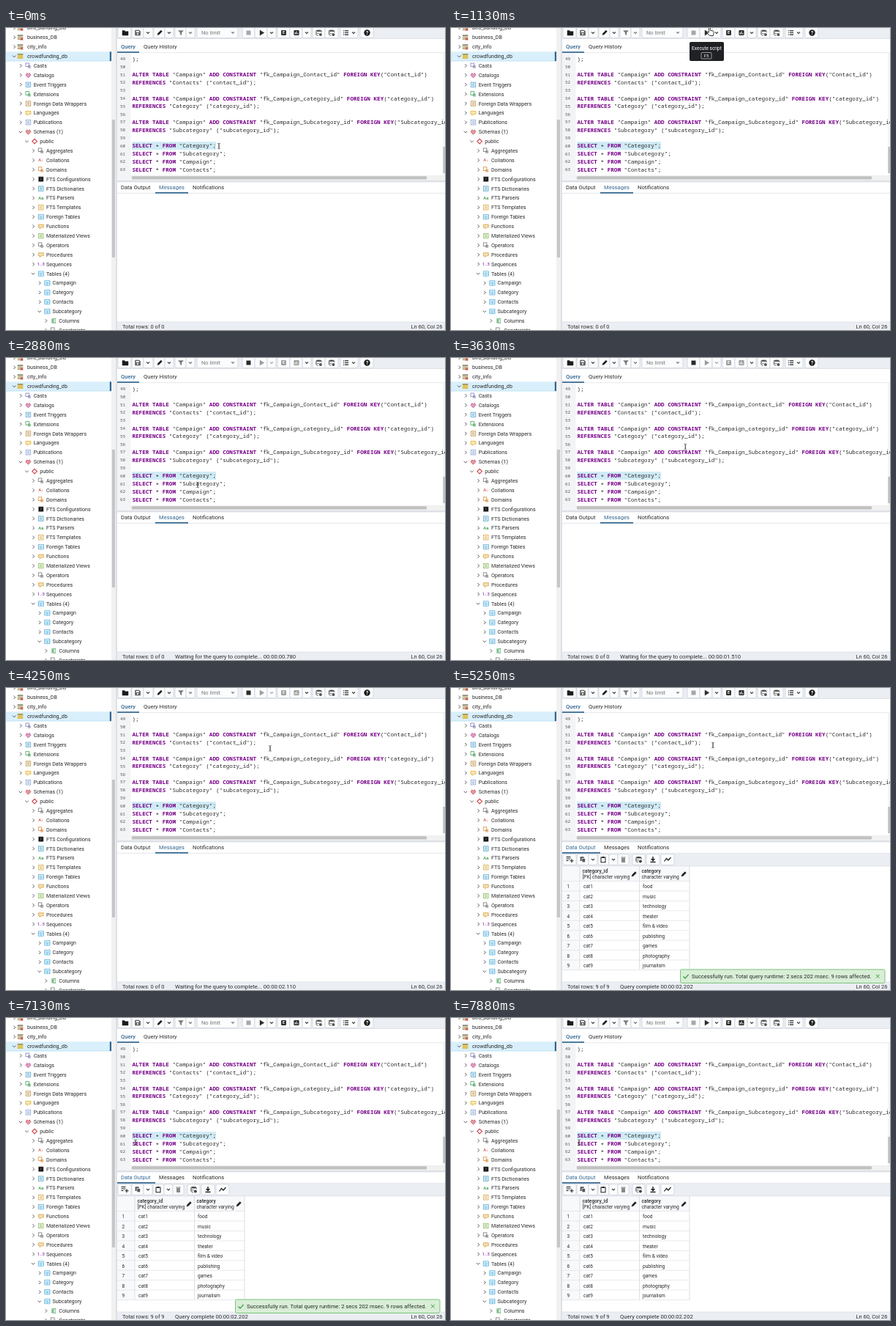
Write an HTML page that moves like this. It is 600x412 px and loops after 8 s.

```html
<!DOCTYPE html>
<html lang="en">
<head>
<meta charset="utf-8">
<title>Query tool</title>
<style>
  html, body { margin: 0; width: 100%; height: 100%; overflow: hidden; background: #fff; }
  svg { display: block; width: 600px; height: 412px; }
  text { font-family: Roboto, sans-serif; white-space: pre; }
  .code { font-family: "Noto Sans Mono", monospace; }
  .kw { font-weight: 700; fill: #708; }
  .stop { opacity: .4; }
  .running .stop { opacity: 1; }
  .running .exec { opacity: .45; }
</style>
</head>
<body>
<svg id="stage" viewBox="0 0 600 412"></svg>
<script>
const INK = '#2a2a2a', BLUE = '#326690', BAR = '#ebeef3', LINE = '#dde0e6';

const rect = (x, y, w, h, fill, more = '') =>
  `<rect x="${x}" y="${y}" width="${w}" height="${h}" fill="${fill}" ${more}/>`;
const path = (d, stroke = INK, width = 1, fill = 'none') =>
  `<path d="${d}" stroke="${stroke}" stroke-width="${width}" fill="${fill}"/>`;
// y is the vertical middle of the text
const text = (x, y, s, size = 7.6, fill = INK, more = '') =>
  `<text x="${x}" y="${y + size * .35}" font-size="${size}" fill="${fill}" ${more}>${s}</text>`;
const group = (body, attrs = '') => `<g ${attrs}>${body}</g>`;
const at = (x, y, body) => group(body, `transform="translate(${x} ${y})"`);
const caret = (x, y, color = '#444') => path(`M${x - 2} ${y - 1}l2 2l2-2`, color, 1.1);
const button = (x, y, w, h) => rect(x, y, w, h, '#fbfcfd', 'stroke="#c9cfd8" stroke-width=".7" rx="2"');

// ---- object tree -------------------------------------------------
const TREE = `0 > off bird_banding_DB
0 > off business_DB
0 > off city_info
0 v db crowdfunding_db
1 > boxes#7d7fb5 Casts
1 > heart#c14f8e Catalogs
1 > cells#4a9cd0 Event Triggers
1 > boxes#45a05a Extensions
1 > cells#b98b3c Foreign Data Wrappers
1 > bubble#e5b52c Languages
1 > cells#7f9fd0 Publications
1 v heart#c44a54 Schemas (1)
2 v diamond#d0474e public
3 > boxes#777 Aggregates
3 > glyph#d0605c:A↓ Collations
3 > boxes#d98a35 Domains
3 > cells#888 FTS Configurations
3 > cells#3c9cc4 FTS Dictionaries
3 > glyph#46a04c:Aa FTS Parsers
3 > cells#d9a33a FTS Templates
3 > table#3f9ac9 Foreign Tables
3 > bubble#d9a33a Functions
3 > cells#7fb84c Materialized Views
3 > boxes#777 Operators
3 > bubble#d9a33a Procedures
3 > glyph#9a4fb5:1..3 Sequences
3 v table#2f9fd8 Tables (4)
4 > table#2f9fd8 Campaign
4 > table#2f9fd8 Category
4 > table#2f9fd8 Contacts
4 v table#2f9fd8 Subcategory
5 > cols#45a05a Columns
5 > boxes#777 Constraints`;

const disk = (...colors) => colors.map((c, i) =>
  rect(-4, -3.5 + i * 2.4, 8, 1.9, c, 'rx=".9"')).join('');
const ICONS = {
  off: () => disk('#8f8a72', '#b9ad80', '#b9ad80') + path('M.6 .8l3 3m0-3l-3 3', '#d23b3b', 1.1),
  db: () => disk('#a89a55', '#e3b52d', '#e3b52d'),
  boxes: c => rect(-3.5, -3.5, 4.6, 4.6, 'none', `stroke="${c}" stroke-width=".8"`)
    + rect(-.6, -.6, 4, 4, c, 'opacity=".6"'),
  heart: c => path('M0 3.5L-3.4 0L-1.8-2.8L0-1.4L1.8-2.8L3.4 0Z', c, .8, c + '88'),
  cells: c => rect(-3.3, -3.2, 6.6, 6.4, c + '22', `stroke="${c}" stroke-width=".7"`)
    + path('M-1.6-1h3.2M-1.6 1h3.2', c, .8),
  bubble: c => path('M-3.5-2.5h7v4h-3l-2 2v-2h-2z', c, .8, c + '55'),
  diamond: c => path('M0-3.3L3.3 0L0 3.3L-3.3 0Z', c, 1.2),
  table: c => rect(-3.6, -3.2, 7.2, 6.4, '#eef8fd', `stroke="${c}" stroke-width=".6"`)
    + path('M-3.6-1.1h7.2M-3.6 1h7.2M0-1.1v4.3', c, .5),
  cols: c => rect(-2.6, -3.2, 2.1, 6.4, c, 'opacity=".8"')
    + rect(.6, -3.2, 2.1, 6.4, 'none', `stroke="${c}" stroke-width=".6"`),
  glyph: (c, s) => text(0, 0, s, 5.8, c, 'text-anchor="middle" font-weight="700"'),
};

function tree() {
  let out = rect(0, 32.3, 144, 12.8, '#d9effb') + path('M0 45h144', '#a9d3ec', .6)
    + rect(141.8, 32.3, 2.2, 12.8, BLUE);
  TREE.split('\n').forEach((row, i) => {
    const [, level, state, icon, label] = row.match(/^(\d) (\S) (\S+) (.+)$/);
    const [, kind, color, glyph] = icon.match(/^(\w+?)(#\w+)?(?::(.*))?$/);
    const y = 38.6 + (i - 3) * 12.89, x = 29 + level * 8.65;
    out += state === 'v' ? path(`M${x - 20} ${y - 1}l2.2 2.2l2.2-2.2`, '#444', .9)
                         : path(`M${x - 18.5} ${y - 2.2}l2.2 2.2l-2.2 2.2`, '#444', .9);
    out += at(x - (level > 0 ? 7.2 : 9.5), y, ICONS[kind](color, glyph)) + text(x, y, label, 7.15);
  });
  return out + rect(144, 0, 6, 412, '#f1f1f1') + rect(144.8, 125, 4.2, 188, '#c4c6c9')
    + rect(150, 0, 2, 412, LINE);
}

// ---- toolbars ----------------------------------------------------
const SHAPES = {
  folder: c => path('M-4-3h3l1 1.2h4v5.3h-8z', c, .5, c),
  save: c => path('M-3.4-3.4h5.4l1.5 1.5v5.3h-6.9z', c, .8, c) + rect(-2.2, -2.5, 4, 1.8, '#fff') + '<circle cy="1.5" r="1.1" fill="#fff"/>',
  pencil: c => path('M-3 3L-2.4.8L1.8-3.4L3.4-1.8L-.8 2.4Z', c, .4, c),
  filter: c => path('M-3.4-3h6.8L.9 0v3.2l-1.8-1.2V0z', c, .4, c),
  stop: c => rect(-3, -3, 6, 6, c),
  play: c => path('M-2.5-3.6L3.3 0L-2.5 3.6z', c, .4, c),
  explain: c => rect(-3.4, -3.6, 6.8, 7.2, c, 'rx="1"') + text(0, 0, 'E', 5.4, '#fff', 'text-anchor="middle" font-weight="700"'),
  chart: c => rect(-3.6, -3.4, 7.2, 6.8, c, 'rx="1"') + path('M-1.8 2v-2.4M0 2v-4M1.8 2v-1.4', '#fff', 1),
  store: c => `<ellipse cy="-2.8" rx="3.6" ry="1.3" fill="${c}"/>`
    + path('M-3.6-2.8v5.4q1.2 1 3 1M3.6-2.8v2.4M-3.6 0q1.4 1.1 3.8.9', c, .9)
    + `<circle cx="2.4" cy="2.4" r="2" fill="${c}"/>`,
  list: c => path('M-1.6-2.6h5.2M-1.6 0h5.2M-1.6 2.6h5.2', c, 1.1) + path('M-3.6-2.6h1M-3.6 0h1M-3.6 2.6h1', c, 1.2),
  help: c => `<circle r="4.2" fill="${c}"/>` + text(0, 0, '?', 6.5, '#fff', 'text-anchor="middle" font-weight="700"'),
  addRow: c => path('M-4.5-2.5h6M-4.5 0h6M-4.5 2.5h3M3 .2v5M.5 2.7h5', c, 1.1),
  copy: c => rect(-3.4, -3.8, 5, 5.8, c) + rect(-1, -1.6, 4.6, 5.4, c, 'stroke="#fff" stroke-width=".7"'),
  paste: c => rect(-3, -3, 6, 6.8, 'none', `stroke="${c}"`) + rect(-1.5, -4, 3, 2, c),
  trash: c => rect(-2.5, -2, 5, 6, c) + path('M-3.3-3h6.6', c, 1.1),
  down: c => path('M0-4v5M-2.4-1L0 1.4L2.4-1', c, 1.4) + path('M-3.6 3.4h7.2', c, 1.4),
  graph: c => path('M-4.5 2.5l3-4l2.5 2.5l3.5-4', c, 1.2),
};
const icon = (name, x, y, color = '#1c1c1c', cls = '') => group(at(x, y, SHAPES[name](color)), `class="${cls}"`);

function topBar() {
  const boxes = [[153, 18], [172, 16], [188, 13], [202, 15], [217, 12], [231, 15], [246, 12], [261, 56],
    [323, 17], [340, 17], [357, 12], [371, 17], [388, 17], [405, 12], [419, 17], [436, 18], [457, 24], [484, 18]];
  return rect(152, 0, 448, 15, BAR) + boxes.map(([x, w]) => button(x, -4, w, 17.5)).join('')
    + icon('folder', 163, 6.5) + icon('save', 180, 6.5, '#666') + caret(194, 6.5)
    + icon('pencil', 210, 6.5) + caret(223, 6.5) + icon('filter', 239, 6.5, '#777') + caret(252, 6.5, '#777')
    + text(267, 6.5, 'No limit', 7.5, '#777') + path('M307.5 5.5h5l-2.5 2.6z', '#888', .2, '#888')
    + icon('stop', 331.5, 6.5, INK, 'stop') + icon('play', 349.5, 6.5, INK, 'exec')
    + group(caret(363, 6.5), 'class="exec"')
    + icon('explain', 379.5, 6.5, INK, 'exec') + icon('chart', 397, 6.5, INK, 'exec') + caret(411, 6.5)
    + icon('store', 427.5, 6.5, '#555') + icon('store', 445, 6.5, '#555')
    + icon('list', 464.5, 6.5) + caret(475, 6.5) + icon('help', 493.5, 6.5)
    + rect(152, 15, 448, 19, '#fff') + path('M152 14.5h448M152 33.7h448', LINE, .8)
    + text(157, 25, 'Query', 7.6, BLUE, 'font-weight="500"') + text(188, 25, 'Query History')
    + rect(152, 32.2, 30, 1.7, BLUE);
}

// ---- editor ------------------------------------------------------
const CODE = [');', '',
  ...['Contact:Contacts:contact', 'category:Category:category', 'Subcategory:Subcategory:subcategory'].flatMap(s => {
    const [key, table, column] = s.split(':');
    return [`ALTER TABLE "Campaign" ADD CONSTRAINT "fk_Campaign_${key}_id" FOREIGN KEY("${key}_id")`,
      `REFERENCES "${table}" ("${column}_id");`, ''];
  }),
  ...['Category', 'Subcategory', 'Campaign', 'Contacts'].map(t => `SELECT * FROM "${t}";`)];

// Keywords are bold; the asterisk sits at mid height.
const markup = line => line.replace(/"[^"]*"|[A-Z]+|\* /g, w =>
  w[0] === '"' ? w
    : w === '* ' ? '<tspan dy="1.4">*</tspan><tspan dy="-1.4"> </tspan>'
    : `<tspan class="kw">${w}</tspan>`);

function editor() {
  let out = rect(152, 34, 18.5, 174, '#f3f4f6') + rect(172, 155.2, 115, 10.8, '#cfebf5')
    + rect(597, 34, 3, 167, '#f6f6f6');
  CODE.forEach((line, i) => {
    const y = 42 + i * 10.79;
    out += text(156, y, 49 + i, 6, '#555', 'class="code"') + text(172.4, y, markup(line), 7.65, INK, 'class="code"');
  });
  return out + rect(170.5, 200.8, 429.5, 7.4, '#f1f1f1') + rect(172, 202.2, 403, 4.2, '#c1c1c1', 'rx="1"')
    + rect(597.3, 162, 2.7, 36, '#c1c1c1') + rect(152, 208, 448, 2.4, LINE);
}

// ---- lower panel -------------------------------------------------
const tabs = active => path('M152 225.4h448', LINE, .8)
  + [[157, 'Data Output', 152, 52], [209, 'Messages', 204, 45], [255, 'Notifications', 250, 54]].map(([x, s, ux, w], i) =>
    text(x, 217, s, 7.6, i === active ? BLUE : INK)
    + (i === active ? rect(ux, 224, w, 1.7, BLUE) : '')).join('');

function results() {
  const rows = ['food', 'music', 'technology', 'theater', 'film &amp; video', 'publishing', 'games', 'photography', 'journalism'];
  const bottom = 263.5 + 13.45 * rows.length;
  let out = rect(152, 226, 448, 16.5, BAR)
    + [[153, 18], [172, 16], [188, 12], [201, 15], [216, 12], [228, 15], [248, 17], [267, 18], [287, 18]]
      .map(([x, w]) => button(x, 226.8, w, 14.6)).join('')
    + icon('addRow', 162, 233) + icon('copy', 180, 234, '#555') + caret(194, 234) + icon('paste', 208, 234)
    + caret(222, 234) + icon('trash', 235.5, 234, '#888') + icon('store', 256.5, 234, '#444')
    + icon('down', 276, 234) + icon('graph', 296, 234)
    + rect(152, 243, 174, 20.5, '#f8f9fb') + rect(152, 263, 24, bottom - 263, '#f8f9fb')
    + path(`M152 242.8h448M176 243V${bottom}M257.5 243V${bottom}M326 243V${bottom}`, '#d4d8df', .8);
  [[179.5, 'category_id', '[PK] character varying', 250], [260.5, 'category', 'character varying', 318]]
    .forEach(([x, name, type, px]) => {
      out += text(x, 249.5, name, 6.7, INK, 'font-weight="500"') + text(x, 257.8, type, 6.7) + icon('pencil', px, 254);
    });
  rows.forEach((name, i) => {
    const y = 271.1 + i * 13.45;
    out += text(158.5, y, i + 1, 6.5) + text(181, y, 'cat' + (i + 1), 6.6) + text(262, y, name, 6.6);
  });
  for (let i = 0; i <= rows.length; i++) out += path(`M152 ${263.5 + i * 13.45}h174`, LINE, .7);
  return out;
}

const toast = rect(313.5, 384, 279.5, 18.5, '#d8eed6', 'stroke="#7cc47c" rx="2"')
  + path('M317.5 393.5l2.5 2.6l4.6-5.2', '#3c9a42', 1.3)
  + text(329, 393.4, 'Successfully run. Total query runtime: 2 secs 202 msec. 9 rows affected.', 7.65)
  + path('M581 391l4.6 4.6m0-4.6l-4.6 4.6', '#3c9a42', 1);

const tooltip = rect(326, 19, 47, 26, '#1f2125', 'rx="2"')
  + text(349.5, 27.6, 'Execute script', 6.5, '#fff', 'text-anchor="middle"')
  + rect(342, 33.5, 14, 8.5, 'none', 'stroke="#ccc" stroke-width=".7" rx="1"')
  + text(349, 37.8, 'F5', 6, '#fff', 'text-anchor="middle"');

const beam = path('M-1.8-3.8q1.8 0 1.8 1v5.6q0 1-1.8 1M1.8-3.8q-1.8 0-1.8 1v5.6q0 1 1.8 1', '#333', .7);
const hand = path('M-1.6-5q1-1.2 2 0v3.2l4 1q1 .4.8 1.6l-.8 4.7h-5l-3.4-4.2q.2-1.4 2.4-.2z', INK, .9, '#fff');

const stage = document.getElementById('stage');
stage.innerHTML = tree() + topBar() + editor()
  + group(tabs(1), 'id="idle"') + group(tabs(0) + results(), 'id="done"')
  + rect(152, 401, 448, 11, BAR) + path('M152 401h448', LINE, .8)
  + text(159, 407.6, '', 7.5, INK, 'id="rows"') + text(231, 407.6, '', 7.65, INK, 'id="status"')
  + text(596.5, 407.6, 'Ln 60, Col 26', 7.5, INK, 'text-anchor="end"')
  + group(toast, 'id="toast"') + group(tooltip, 'id="tip"')
  + group(group(beam, 'id="beam"') + group(hand, 'id="hand"'), 'id="pointer"');

// ---- timeline, in steps of 125 ms --------------------------------
const STEP = 125, LOOP = 8000, START = 17, END = 35;
const MOVES = [[0, 291, 161], [7, 354, 5], [16, 354, 5], [22, 262, 173], [24, 262, 173], [33, 362, 84],
  [36, 358, 78], [47, 358, 78], [54, 177, 170], [58, 177, 170], [60, 175, 170], [64, 175, 170]];

function pointerAt(step) {
  const i = MOVES.findIndex(m => m[0] > step);
  const [s0, x0, y0] = MOVES[i - 1], [s1, x1, y1] = MOVES[i];
  const u = (step - s0) / (s1 - s0), k = u * u * (3 - 2 * u);
  return [x0 + (x1 - x0) * k, y0 + (y1 - y0) * k];
}

const byId = id => document.getElementById(id);
const show = (id, opacity) => byId(id).setAttribute('opacity', +opacity);

function draw() {
  const time = performance.now() % LOOP, step = Math.floor(time / STEP);
  const running = step >= START && step < END, done = step >= END;
  const elapsed = Math.round(78 + (step - 23) * 12.09) * 10;
  const clock = '00:00:0' + (elapsed / 1000).toFixed(3);
  const [x, y] = pointerAt(step);

  stage.classList.toggle('running', running);
  show('idle', !done);
  show('done', done);
  show('tip', step >= 8 && step < START);
  show('toast', done ? Math.max(0, Math.min(1, (7700 - time) / 200)) : 0);
  byId('rows').textContent = done ? 'Total rows: 9 of 9' : 'Total rows: 0 of 0';
  byId('status').textContent = done ? 'Query complete 00:00:02.202'
    : running ? 'Waiting for the query to complete... ' + clock : '';
  byId('pointer').setAttribute('transform', `translate(${x} ${y})`);
  show('hand', y < 14);
  show('beam', y >= 14);
  requestAnimationFrame(draw);
}
draw();
</script>
</body>
</html>
```
